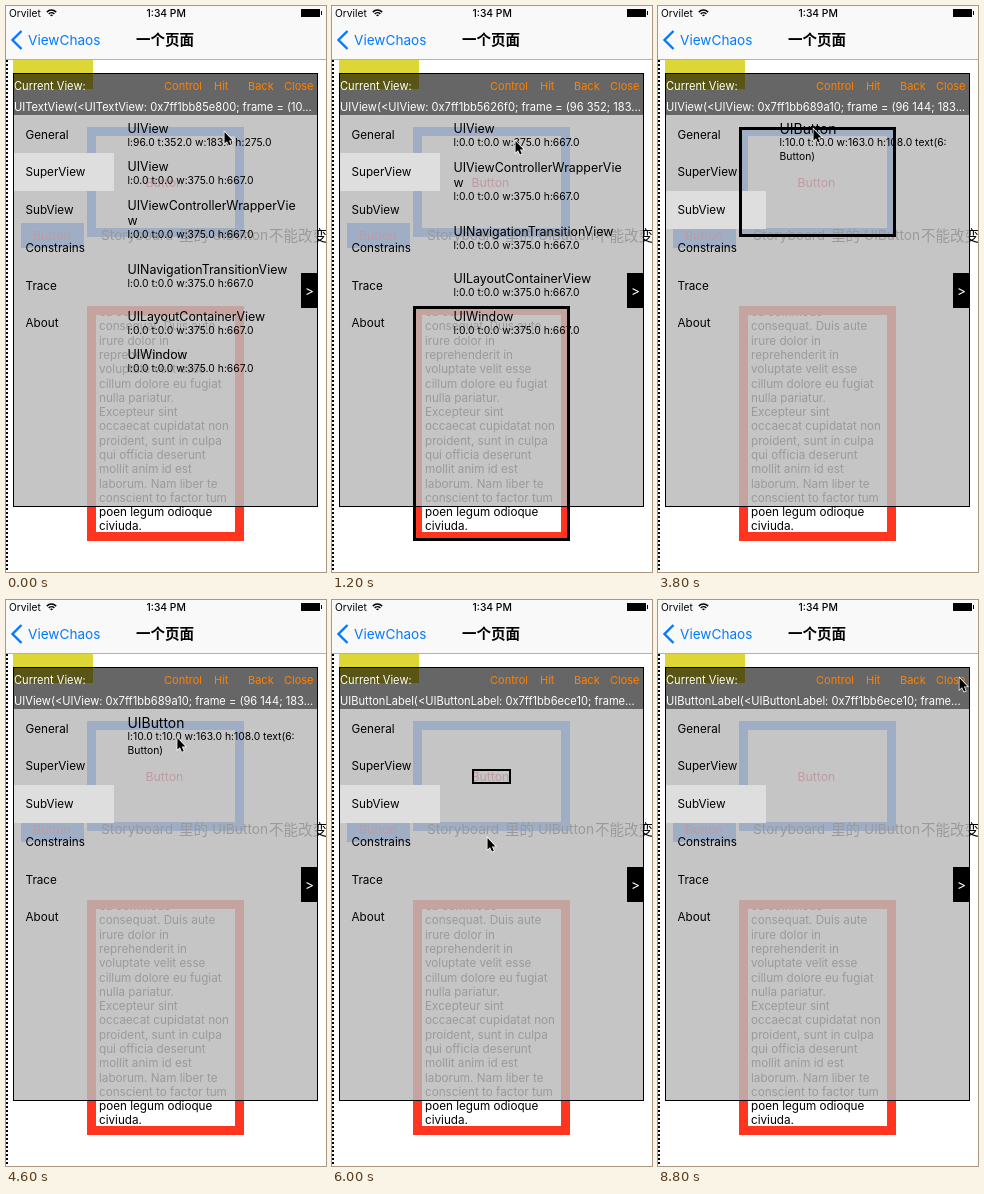
These frames come from a looping animation (320x566 px, 9000 ms). An HTML page with a canvas:

```html
<!DOCTYPE html>
<html lang="zh">
<head>
<meta charset="utf-8">
<style>
  html, body { margin: 0; width: 100%; height: 100%; overflow: hidden; background: #fff; }
  canvas { display: block; }
</style>
</head>
<body>
<canvas id="stage" width="320" height="566"></canvas>
<script>
const ctx = document.getElementById('stage').getContext('2d');
const LOOP = 9000;
const LATIN = 'Inter, Roboto, sans-serif';
const CJK = '"Noto Sans CJK SC", "Noto Sans CJK", sans-serif';
const BLUE = '#1e78ff', LINK = '#007aff', RED = '#ff3520', PINK = '#e00030';

const passage = `ea commodo
consequat. Duis aute
irure dolor in
reprehenderit in
voluptate velit esse
cillum dolore eu fugiat
nulla pariatur.
Excepteur sint
occaecat cupidatat non
proident, sunt in culpa
qui officia deserunt
mollit anim id est
laborum. Nam liber te
conscient to factor tum
poen legum odioque
civiuda.`.split('\n');

const menu = ['General', 'SuperView', 'SubView', 'Constrains', 'Trace', 'About'];
const actions = [['Control', 158], ['Hit', 208], ['Back', 242], ['Close', 278]];

// Superview chain: y of the title, title lines, then the frame text
const FULL = 'l:0.0 t:0.0 w:375.0 h:667.0';
const chain = [
  [122.5, ['UIView'], 'l:96.0 t:352.0 w:183.0 h:275.0'],
  [160.5, ['UIView'], FULL],
  [200, ['UIViewControllerWrapperVie', 'w'], FULL],
  [263.5, ['UINavigationTransitionView'], FULL],
  [311, ['UILayoutContainerView'], FULL],
  [348.5, ['UIWindow'], FULL]
];
const ancestors = skip => chain.slice(skip).map(([y, ...row]) => [y - 38 * skip, ...row]);
const single = (name, ...details) => [[122.5, [name], ...details]];

const box = { text: [81, 300, 157, 235], screen: [0, 0, 320, 566], blue: [81, 121, 157, 110],
              button: [89, 130, 140, 92], label: [140, 169, 39, 15] };
const rootView = 'UIView(<UIView: 0x7ff1bb6896d0; frame = (0 0; 375 66...';
const blueView = 'UIView(<UIView: 0x7ff1bb689a10; frame = (96 144; 183...';

// Each state: start time, selected tab, header line, list rows, outlined box, outline end
const states = [
  [0, 1, 'UITextView(<UITextView: 0x7ff1bb85e800; frame = (10...', ancestors(0)],
  [700, 1, 'UIView(<UIView: 0x7ff1bb5626f0; frame = (96 352; 183...', ancestors(1), box.text, 1600],
  [1700, 1, rootView, ancestors(2), box.screen, 2590],
  [3100, 2, rootView, single('UIView', 'l:96.0 t:144.0 w:183.0 h:128.0')],
  [3600, 2, blueView, single('UIButton', 'l:10.0 t:10.0 w:163.0 h:108.0 text(6:', 'Button)'), box.blue, 4500],
  [4900, 2, 'UIButton(<UIButton: 0x7ff1bb6ec840; frame = (10 10;...',
    single('UIButtonLabel', 'l:60.0 t:45.0 w:46.0 h:18.0'), box.button, 5500],
  [5600, 2, 'UIButtonLabel(<UIButtonLabel: 0x7ff1bb6ece10; frame...', [], box.label, 6500]
];

// Pointer stops: time, x, y
const stops = [[0, 218, 126], [200, 218, 126], [600, 184, 134], [1200, 183, 135], [1900, 183, 135],
  [2600, 118, 165], [2950, 60, 204], [3100, 60, 204], [3500, 155, 123], [3800, 155, 123],
  [4500, 172, 140], [4900, 165, 128], [5500, 160, 128], [6000, 155, 238], [7400, 157, 246],
  [8400, 292, 78], [8800, 301, 78], [9000, 301, 78]];

function rect(color, x, y, w, h) {
  ctx.fillStyle = color;
  ctx.fillRect(x, y, w, h);
}

function frame(color, [x, y, w, h], line) {
  ctx.strokeStyle = color;
  ctx.lineWidth = line;
  ctx.strokeRect(x + line / 2, y + line / 2, w - line, h - line);
}

// y is the optical middle of the line
function text(str, x, y, size, color = '#000', weight = 400, family = LATIN) {
  ctx.font = `${weight} ${size}px ${family}`;
  ctx.fillStyle = color;
  ctx.fillText(str, x, y + size * 0.36);
}

function path(points, color, width) {
  ctx.beginPath();
  points.forEach(([x, y]) => ctx.lineTo(x, y));
  ctx.strokeStyle = color;
  ctx.lineWidth = width;
  ctx.stroke();
}

function drawBars() {
  rect('#f9f9f9', 0, 0, 320, 53);
  rect('#b2b2b2', 0, 53, 320, 1);
  text('Orvilet', 3, 7, 10.2);
  ctx.strokeStyle = '#000';
  ctx.lineWidth = 1.5;
  [1.2, 3.8, 6.4].forEach(r => {
    ctx.beginPath();
    ctx.arc(45.5, 10.5, r, -Math.PI * 0.76, -Math.PI * 0.24);
    ctx.stroke();
  });
  text('1:34 PM', 140.5, 7, 10.3, '#000', 500);
  rect('#000', 295, 3, 19, 8);
  rect('#000', 315, 5, 1, 4);
  path([[15.5, 25], [6.5, 34], [15.5, 43]], LINK, 2.4);
  text('ViewChaos', 22, 34, 13.6, LINK);
  text('一个页面', 130, 34, 14.5, '#000', 600, CJK);
}

function drawPage() {
  rect('#fff', 0, 0, 320, 566);
  rect('#dcd636', 7, 54, 80, 29);
  frame(BLUE, box.blue, 9);
  text('Button', 139.5, 176.5, 12.3, PINK);
  rect(BLUE, 15, 217, 63, 25);
  text('Button', 27, 229.5, 12.3, PINK);
  text('Storyboard', 95, 229.5, 13.7);
  text('里的', 173, 229.5, 14.5, '#000', 400, CJK);
  text('UIButton', 206, 229.5, 13.7);
  text('不能改变', 263, 229.5, 14.5, '#000', 400, CJK);
  ctx.save();
  ctx.beginPath();
  ctx.rect(89, 309, 140, 218);
  ctx.clip();
  passage.forEach((line, i) => text(line, 93, 306 + i * 14.28, 11.7));
  ctx.restore();
  frame(RED, box.text, 9);
  ctx.setLineDash([2, 2]);
  path([[1, 54], [1, 566]], '#000', 2);
  ctx.setLineDash([]);
  drawBars();
}

function drawPanel(tab, header, rows) {
  rect('rgba(0,0,0,.6)', 8, 68, 303, 41);
  rect('rgba(186,186,186,.83)', 8, 109, 303, 391);
  frame('#000', [7, 67, 305, 434], 1);
  text('Current View:', 8, 80.5, 11.1, '#fff');
  actions.forEach(([label, x]) => text(label, x, 80.5, 11, '#ff8000'));
  text(header, 8, 101, 11.1, '#fff');
  rect('#dedede', 8, 147 + (tab - 1) * 38, 100, 38);
  menu.forEach((label, i) => text(label, 19.5, 128.5 + i * 37.75, 11.7));
  rows.forEach(([y, title, ...details]) => {
    const size = title[0] === 'UIButton' ? 13.9 : 12.4;
    title.forEach((line, i) => text(line, 121.5, y + i * 15, size));
    const top = y + 13.5 + (title.length - 1) * 15;
    details.forEach((line, i) => text(line, 121.5, top + i * 14, 10.35));
  });
  rect('#000', 295, 267, 17, 35);
  text('>', 299, 285, 13.6, '#fff');
}

function drawPointer(time) {
  const i = stops.findIndex(stop => stop[0] > time);
  const [t0, x0, y0] = stops[i - 1], [t1, x1, y1] = stops[i];
  const p = (time - t0) / (t1 - t0), k = p * p * (3 - 2 * p);
  ctx.save();
  ctx.translate(x0 + (x1 - x0) * k, y0 + (y1 - y0) * k);
  ctx.beginPath();
  [[0.5, 0], [0.5, 11.5], [3, 9.2], [5, 13.6], [6.8, 12.8], [4.9, 8.5], [8.5, 8.4]]
    .forEach(([x, y]) => ctx.lineTo(x, y));
  ctx.closePath();
  ctx.strokeStyle = '#fff';
  ctx.lineWidth = 1.4;
  ctx.stroke();
  ctx.fillStyle = '#000';
  ctx.fill();
  ctx.restore();
}

function draw() {
  const time = performance.now() % LOOP;
  const [, tab, header, rows, outline, until] = states.filter(state => state[0] <= time).pop();
  drawPage();
  drawPanel(tab, header, rows);
  if (outline && time < until) frame('#000', outline, outline === box.label ? 2 : 3);
  drawPointer(time);
  requestAnimationFrame(draw);
}
draw();
</script>
</body>
</html>
```
